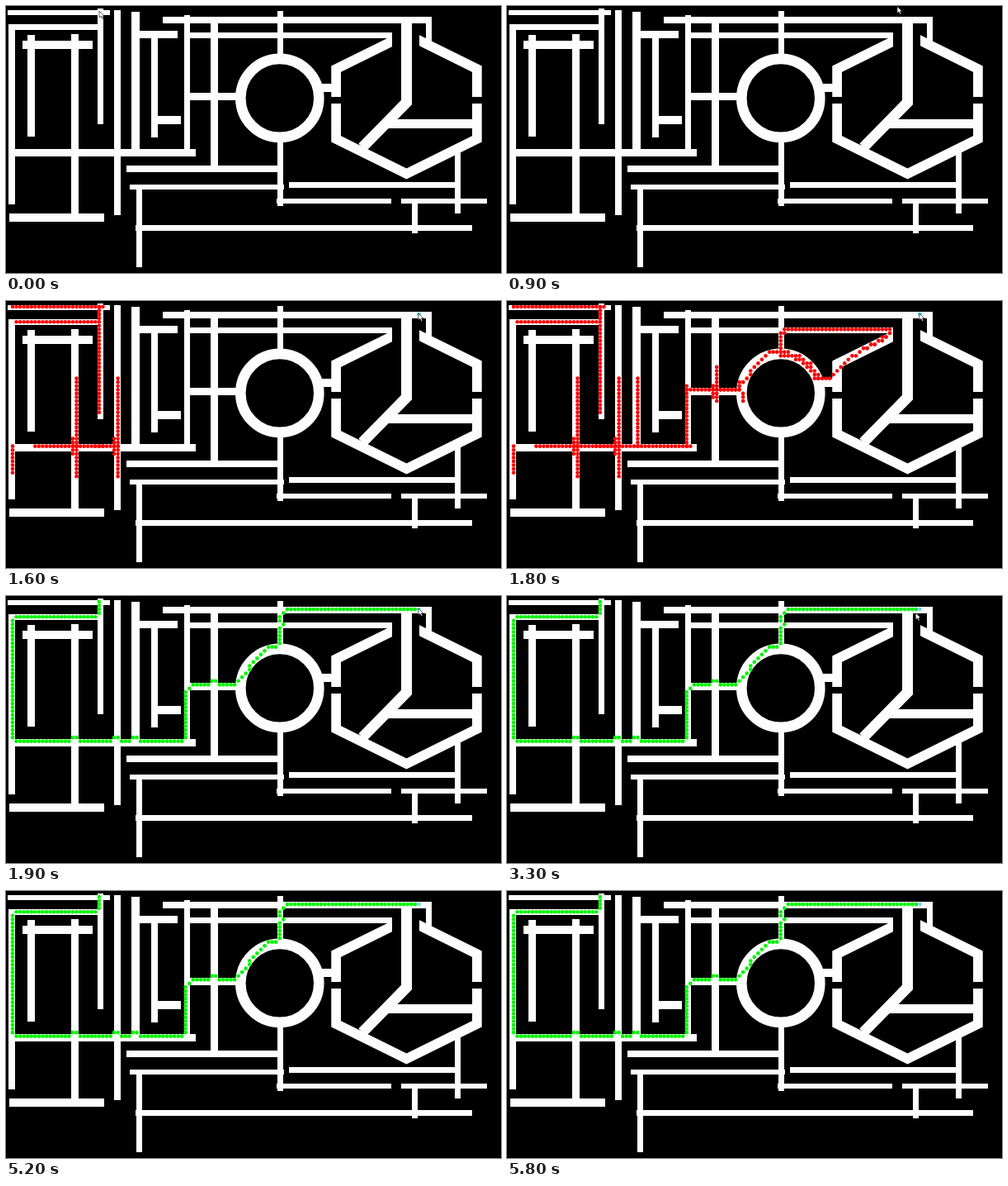
Recreate the animation shown at these times as an HTML page with a canvas. Size 600 px wide and 323 px high, loop 5.9 s.

```html
<!DOCTYPE html>
<html lang="en">
<head>
<meta charset="utf-8">
<title>Path search</title>
<style>
  html, body { margin: 0; width: 100%; height: 100%; overflow: hidden; background: #000; }
  canvas { display: block; }
</style>
</head>
<body>
<canvas id="stage" width="600" height="323"></canvas>
<script>
const ctx = document.getElementById('stage').getContext('2d');
const LOOP = 5900, TICK = 100, CELL = 4.56, LEFT = 8, TOP = 7;
const SEARCH = 1500, FOUND = 1900, GOAL_SET = 1200;
const ring = { x: 331.8, y: 111.4, r: 47.5 };
const hex = { x: 485.5, y: 118.5, rx: 98.6, ry: 84.5 };

// Straight corridors by width: direction, fixed coordinate, from, to
const corridors = {
  6: 'h 8 2 126, h 219 150 337, h 236 328 467, h 236 479 583',
  7: `h 25.5 3 112, h 35.5 223 468, h 268.5 157 565, h 216.5 343 546, v 114.5 3 143,
      v 219.5 11 180, v 161.5 222 316, v 332.5 6 62, v 332.5 162 242, v 495.5 233 275,
      v 547.5 176 251, v 512.5 14 44`,
  8: 'h 17 190 516, h 197 146 330, v 7 22 240, v 135 5 253, v 180 39 159',
  9: `h 34.5 162 208, h 177.5 3 230, h 109.5 223 281, v 30.5 35 158, v 83.5 34 252,
      v 252.5 20 194`,
  10: 'h 47 20 105, h 256 4 119, h 138 184 212, h 99 382 396, v 157 7 173',
  11: 'h 142.5 463 566'
};

const clamp = u => Math.min(1, Math.max(0, u));
const cellX = i => LEFT + i * CELL;
const cellY = j => TOP + j * CELL;

// Grid cells along a chain of corner cells
function chain(...corners) {
  const out = [corners[0]];
  corners.slice(1).forEach(([i1, j1], k) => {
    const [i0, j0] = corners[k];
    const n = Math.max(Math.abs(i1 - i0), Math.abs(j1 - j0));
    for (let s = 1; s <= n; s++) {
      out.push([Math.round(i0 + (i1 - i0) * s / n), Math.round(j0 + (j1 - j0) * s / n)]);
    }
  });
  return out;
}

// The path rises one cell where it crosses an upright corridor
const bump = (i, j) => [[i - 2, j], [i - 1, j - 1], [i, j - 1], [i + 1, j]];
const crossings = [17, 28, 33];

const route = chain([23, 0], [23, 3], [22, 4], [1, 4], [0, 5], [0, 36], [1, 37],
  ...crossings.flatMap(i => bump(i, 37)), [45, 37], [46, 36], [46, 24], [48, 22],
  ...bump(54, 22), [59, 22], [63, 18], [63, 17], [68, 12], [70, 12], [71, 11],
  [71, 7], [72, 6], [71, 5], [71, 4], [73, 2], [107, 2]);

// Free cells on the upper right of the ring
function ringCells() {
  const out = [];
  for (let i = 71; i < 83; i++) {
    for (let j = 10; j < 20; j++) {
      const r = Math.hypot(cellX(i) - ring.x, cellY(j) - ring.y);
      if (Math.abs(r - ring.r) < 3.8) out.push([i, j]);
    }
  }
  return out;
}

const until = test => route.slice(0, route.findIndex(test));
const opening = [...chain([24, 0], [0, 0]), ...chain([23, 0], [23, 28]), ...until(c => c[0] < 1)];
const searched = [
  ...opening,
  ...until(c => c[0] > 17),
  ...chain([0, 37], [0, 44]),
  ...crossings.flatMap(i => [
    ...chain([Math.max(0, i - 11), 37], [i, 37], [i, 19]),
    ...(i < 33 ? [...chain([i, 37], [i, 45]), ...chain([i - 1, 35], [i - 1, 39])] : [])
  ]),
  ...chain([33, 37], [47, 37]), ...chain([46, 37], [46, 21]), ...chain([46, 22], [60, 22]),
  ...chain([54, 16], [54, 25]), ...chain([53, 21], [53, 24]),
  ...chain([60, 20], [61, 25]), ...until(c => c[1] < 6 && c[0] > 60).slice(-26),
  ...ringCells(),
  ...chain([72, 7], [73, 6], [100, 6]),
  ...chain([81, 19], [84, 19], [89, 14], [100, 7]), ...chain([94, 11], [99, 8])
];

function polyline(pts, width, close) {
  ctx.beginPath();
  pts.forEach(p => ctx.lineTo(...p));
  if (close) ctx.closePath();
  ctx.lineWidth = width;
  ctx.stroke();
}

function dot(x, y, color, r = 2.35) {
  ctx.fillStyle = color;
  ctx.beginPath();
  ctx.arc(x, y, r, 0, 7);
  ctx.fill();
}

const dots = (cells, color) => cells.forEach(([i, j]) => dot(cellX(i), cellY(j), color));

function drawMap() {
  ctx.fillStyle = '#000';
  ctx.fillRect(0, 0, 600, 323);
  ctx.strokeStyle = '#fdfdfd';

  const corners = Array.from({ length: 6 }, (_, k) => [
    hex.x + hex.rx * Math.sin(k * Math.PI / 3), hex.y - hex.ry * Math.cos(k * Math.PI / 3)
  ]);
  polyline(corners, 11.7, true);
  ctx.fillRect(390, 110, 190, 8);
  ctx.fillRect(468, 20, 33, 40);
  polyline([[hex.x, 18], [hex.x, 116.5], [432, 171]], 13);

  for (const width in corridors) {
    for (const item of corridors[width].split(',')) {
      const [dir, ...nums] = item.trim().split(' ');
      const [at, from, to] = nums.map(Number);
      polyline(dir === 'h' ? [[from, at], [to, at]] : [[at, from], [at, to]], width);
    }
  }
  ctx.lineWidth = 12.6;
  ctx.beginPath();
  ctx.arc(ring.x, ring.y, ring.r, 0, 7);
  ctx.stroke();
}

// Swing to the top edge, come back to the goal, then drop off the bottom
function pointerAt(t) {
  if (t < 800) {
    const u = clamp((t - 100) / 600);
    return [113 + 300 * u, 6 + 110 * u * (1 - u) - 30 * u * u];
  }
  if (t < 3200) {
    const left = (1 - clamp((t - 700) / 500)) ** 2;
    return [500 - 75 * left, 15 - 40 * left];
  }
  const fall = ((t - 3200) / 700) ** 2;
  return [500 - 229 * fall, 15 + 268 * fall];
}

function drawPointer(t) {
  ctx.save();
  ctx.translate(...pointerAt(t));
  const arrow = new Path2D('M0 0V8L2 6.4 3.4 9.4 4.8 8.8 3.5 6 5.8 5.8Z');
  ctx.fillStyle = '#fff';
  ctx.fill(arrow);
  ctx.strokeStyle = '#222';
  ctx.lineWidth = 0.7;
  ctx.stroke(arrow);
  ctx.restore();
}

function draw(t) {
  drawMap();
  if (t >= FOUND) {
    dots(route, '#00f500');
  } else if (t >= SEARCH) {
    const done = (t - SEARCH) / (FOUND - TICK - SEARCH);
    const count = opening.length + done * (searched.length - opening.length);
    dots(searched.slice(0, Math.round(count)), '#f80808');
  }
  if (t >= GOAL_SET) dot(cellX(108), cellY(2), t < FOUND ? '#2fd3d3' : '#78d4ff');
  drawPointer(t);
}

const began = performance.now();
function tick() {
  const t = (performance.now() - began) % LOOP;
  draw(Math.floor(t / TICK) * TICK);
  requestAnimationFrame(tick);
}
tick();
</script>
</body>
</html>
```
